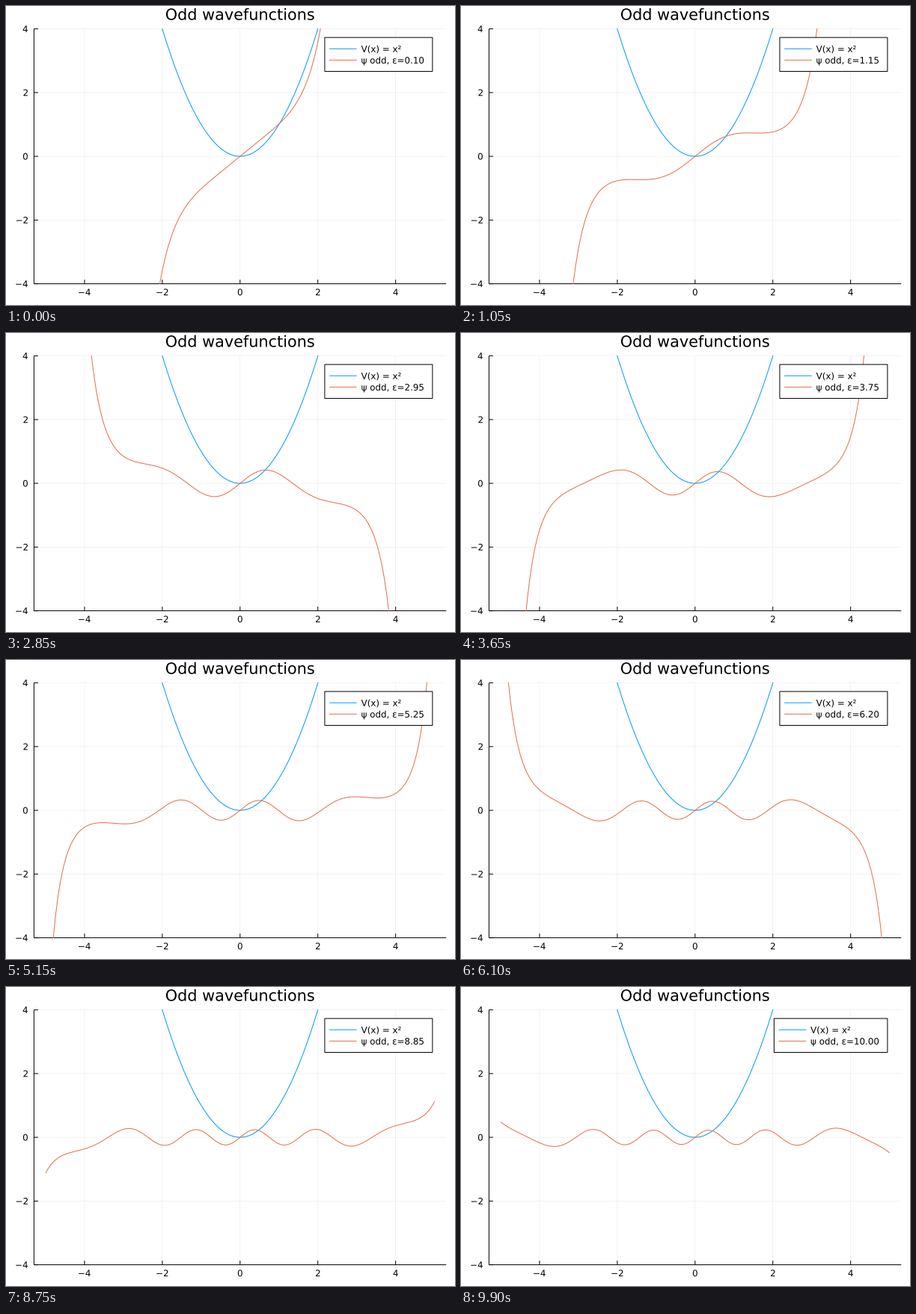
Recreate the animation shown at these times as a matplotlib script. Size 600 by 400 pixels, loop 9950 ms.

```python
import numpy as np
import matplotlib.pyplot as plt
from matplotlib.animation import FuncAnimation
from matplotlib.patches import PathPatch, Rectangle
from matplotlib.textpath import TextPath
from matplotlib.transforms import Affine2D

W, H, DPI = 600, 400, 100
PX = 72 / DPI                      # one pixel in points
LEFT, RIGHT, TOP, BOTTOM = 37.4, 588.2, 30.6, 371.6
XMAX, YMAX = 5.3, 4
SMALL, LARGE = 11.88, 20.79        # font sizes in pixels
BOX_X, BOX_Y, BOX_W, ROW = 425.9, 42.1, 144, 15.12
BLUE, ORANGE = "#009AFA", "#E36F47"
FRAMES, INTERVAL = 199, 50


def to_px(x, y):
    px = LEFT + (x + XMAX) / (2 * XMAX) * (RIGHT - LEFT)
    py = BOTTOM - (y + YMAX) / (2 * YMAX) * (BOTTOM - TOP)
    return px, py


def odd_solutions(eps, x):
    """RK4 for psi'' = (x^2 - 2 eps) psi with psi(0) = 0, psi'(0) = 1."""
    def slope(t, s):
        return np.array([s[1], (t * t - 2 * eps) * s[0]])

    h = x[1] - x[0]
    state = np.array([np.zeros_like(eps), np.ones_like(eps)])
    out = [state[0]]
    for t in x[:-1]:
        k1 = slope(t, state)
        k2 = slope(t + h / 2, state + h / 2 * k1)
        k3 = slope(t + h / 2, state + h / 2 * k2)
        k4 = slope(t + h, state + h * k3)
        state = state + h / 6 * (k1 + 2 * k2 + 2 * k3 + k4)
        out.append(state[0])
    return np.array(out).T


fig = plt.figure(figsize=(W / DPI, H / DPI), dpi=DPI, facecolor="white")
ax = fig.add_axes([0, 0, 1, 1])
ax.set_xlim(0, W)
ax.set_ylim(H, 0)
ax.axis("off")


def line(xs, ys, color="black", width=1.0, z=2, **kw):
    # no snapping: lines keep their sub-pixel places
    return ax.plot(xs, ys, color=color, lw=width * PX, zorder=z, snap=False,
                   solid_capstyle="butt", **kw)[0]


def text_path(s, x, base, size=SMALL, align=0.0):
    """Outline of s; align is 0 for left, 0.5 for centre, 1 for right."""
    path = TextPath((0, 0), s, size=size, prop={"family": "DejaVu Sans"})
    if align:
        box = path.get_extents()
        x -= box.x0 + align * box.width
    return Affine2D().scale(1, -1).translate(x, base).transform_path(path)


def label(*args, **kw):
    patch = PathPatch(text_path(*args, **kw), fc="black", lw=0, zorder=8,
                      snap=False)
    return ax.add_patch(patch)


# grid, ticks and tick labels
for v in (-4, -2, 0, 2, 4):
    name = str(v).replace("-", "\u2212")
    gx, gy = to_px(v, v)
    line([gx, gx], [TOP, BOTTOM], width=0.5, z=1, alpha=0.1)
    line([LEFT, RIGHT], [gy, gy], width=0.5, z=1, alpha=0.1)
    line([gx, gx], [BOTTOM, BOTTOM - 5.5])
    line([LEFT, LEFT + 5.5], [gy, gy])
    label(name, gx, 387.1, align=0.5)
    label(name, 28.9, gy + 4.4, align=1.0)
line([LEFT, LEFT], [TOP, BOTTOM])
line([LEFT, RIGHT], [BOTTOM, BOTTOM])
label("Odd wavefunctions", (LEFT + RIGHT) / 2, 18.6, size=LARGE, align=0.5)

# curves
half = np.linspace(0, 5, 251)
xs = np.concatenate([-half[:0:-1], half])
energies = 0.1 + 0.05 * np.arange(FRAMES)
waves = np.clip(odd_solutions(energies, half), -30, 30)

window = Rectangle((37, 30), 551, 342, transform=ax.transData)
parabola = line(*to_px(xs, xs ** 2), BLUE, z=3)
wave = line([], [], ORANGE, z=4)
for curve in (parabola, wave):
    curve.set_clip_path(window)

# legend
frame = ax.add_patch(Rectangle((BOX_X, BOX_Y), BOX_W, 3 * ROW, fc="white",
                               ec="black", lw=PX, zorder=6, snap=False))
keys = [line([], [], BLUE, z=7), line([], [], ORANGE, z=7)]
entries = [label("V", 0, 0), label("V", 0, 0)]


def place_legend(eps):
    number = f"{eps:.2f}"
    shift = 7.56 * (len(number) - 4)      # one digit wide
    x = BOX_X - shift
    frame.set_x(x)
    frame.set_width(BOX_W + shift)
    texts = ("V(x) = x\u00b2", f"\u03c8 odd, \u03b5={number}")
    for row, (key, entry, s) in enumerate(zip(keys, entries, texts), 1):
        y = BOX_Y + row * ROW
        key.set_data([x + 6.2, x + 42.8], [y, y])
        entry.set_path(text_path(s, x + 48.7, y + 4.5))


def update(i):
    psi = np.concatenate([-waves[i][:0:-1], waves[i]])
    wave.set_data(*to_px(xs, psi))
    place_legend(energies[i])
    return [wave, frame, *keys, *entries]


anim = FuncAnimation(fig, update, frames=FRAMES, interval=INTERVAL,
                     repeat=True, repeat_delay=0, blit=False)
plt.show()
```
